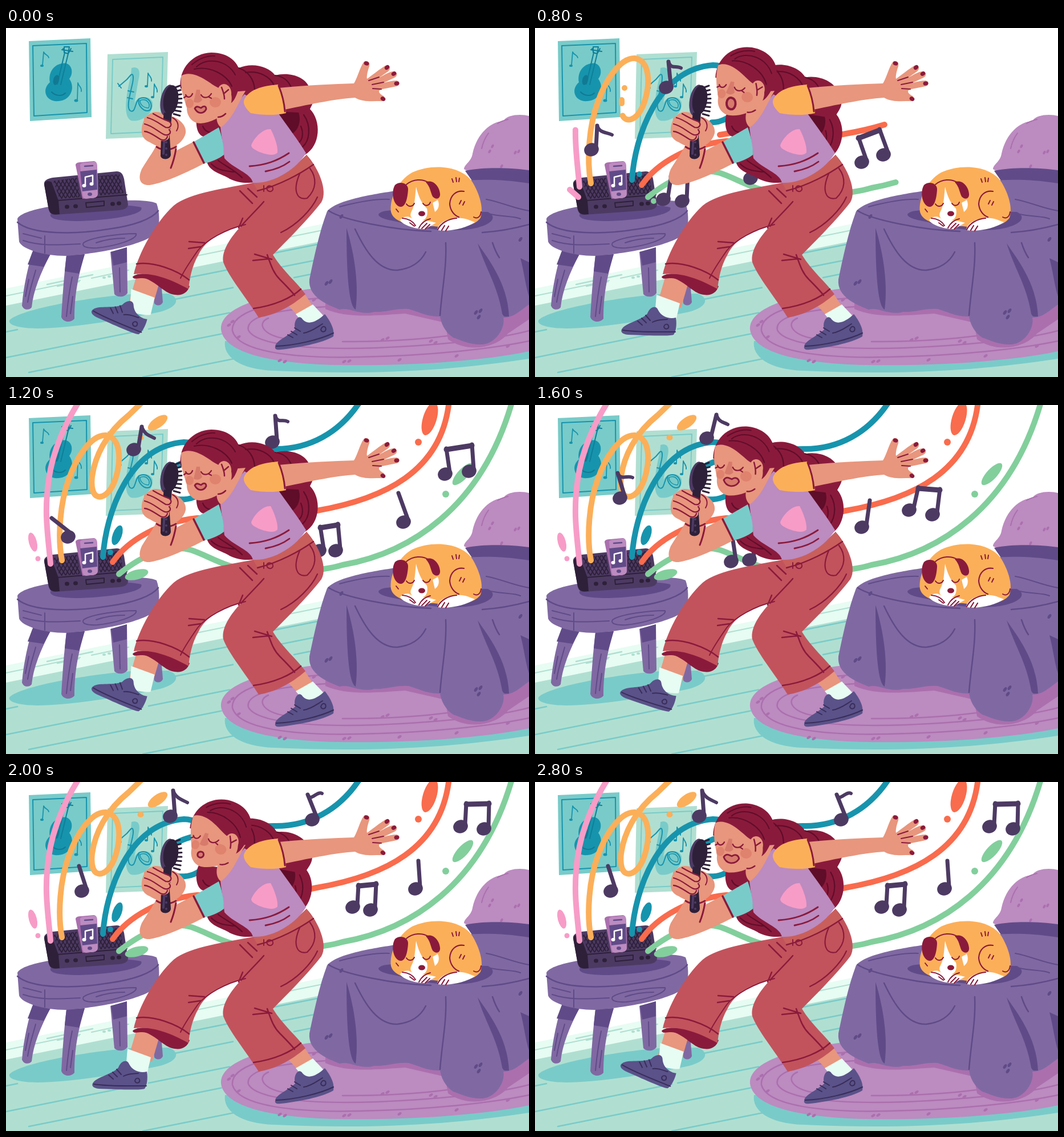
An HTML page with a canvas that plays this animation: 917 by 611 pixels, repeating every 3 s.

```html
<!DOCTYPE html>
<html lang="en">
<head>
<meta charset="utf-8">
<title>Sing along</title>
<style>
html, body { margin: 0; width: 100%; height: 100%; overflow: hidden; background: #fff; }
canvas { display: block; width: 100vw; height: 100vh; }
</style>
</head>
<body>
<canvas id="stage"></canvas>
<script>
const W = 917, H = 611, STEP = 200, STEPS = 15;
const canvas = document.getElementById('stage');
const c = canvas.getContext('2d');
const dpr = window.devicePixelRatio || 1;
canvas.width = W * dpr;
canvas.height = H * dpr;

const WINE = '#8a1a3c', DEEP = '#5f0d29', SKIN = '#e8967d', ROSE = '#d77b6c', BLUSH = '#df826e';
const PLUM = '#8069a2', DUSK = '#604b88', LILAC = '#bc8bc0', MAUVE = '#ab6fae';
const MINT = '#b0dfd1', AQUA = '#79cbc9', SEA = '#1794ad', PALE = '#e7fcf3';
const AMBER = '#fcaf59', BRICK = '#c2535c', INK = '#4d3a63', NIGHT = '#2e2039';
const PINK = '#f79cc7', CORAL = '#f96c4d', LEAF = '#82cf9c', SHOE = '#5a5289', SEAM = '#3a2d59';

function fill(d, color) {
  c.fillStyle = color;
  c.fill(new Path2D(d));
}
function line(d, color, w = 2.5) {
  c.strokeStyle = color;
  c.lineWidth = w;
  c.stroke(new Path2D(d));
}
function oval(x, y, rx, ry, color, deg = 0) {
  c.fillStyle = color;
  c.beginPath();
  c.ellipse(x, y, rx, ry, deg * Math.PI / 180, 0, 7);
  c.fill();
}
function turned(x, y, deg, dx, dy, draw) {
  c.save();
  c.translate(x + dx, y + dy);
  c.rotate(deg * Math.PI / 180);
  c.translate(-x, -y);
  draw();
  c.restore();
}

function posters() {
  fill('M40,23 L148,18 L150,156 L42,163Z', AQUA);
  line('M47,31 L141,27 L142,148 L49,154Z', SEA, 2);
  fill('M98,62 C113,58 121,76 111,89 C123,106 112,127 92,128 C71,130 61,109 77,95 C74,80 82,65 98,62Z', SEA);
  line('M90,98 L103,43 M96,99 L109,45 M103,43 L100,36 M109,45 L114,36 M102,33 L111,33 L109,45 L102,43Z M98,38 L117,41', '#0f7f99', 2);
  oval(88, 91, 5, 9, '#127993', 15);
  line('M80,112 C86,119 98,120 104,114', '#127993', 2);
  line('M64,65 L66,42 C69,48 74,47 75,52 M125,127 L126,96 C128,103 133,103 132,111', SEA, 1.8);
  oval(63, 66, 3, 2, SEA);
  oval(123, 127, 3.5, 2.5, SEA);

  fill('M178,46 L284,42 L280,190 L175,194Z', MINT);
  line('M187,55 L275,51 L271,181 L184,185Z', AQUA, 2);
  fill('M220,70 C232,66 237,74 232,92 L225,132 C230,120 250,116 257,130 C260,150 236,166 219,162 C205,154 210,120 219,82Z', AQUA);
  line('M198,102 L212,90 L219,82 M196,97 L202,105 M219,82 C223,79 224,85 222,96 C216,122 211,140 218,145 C227,150 226,130 233,124 C250,116 260,135 252,144 C242,148 230,136 233,124 M214,110 L224,112 M213,122 L222,124', SEA, 2);
  line('M235,127 C246,122 254,132 250,140 C242,140 235,135 235,127', SEA, 1.5);
  line('M248,101 L249,79 C252,86 256,86 255,93 M259,120 L260,98 C262,104 266,105 265,112', SEA, 1.8);
  oval(246, 102, 3, 2, SEA);
  oval(257, 121, 3, 2, SEA);
}

function room() {
  fill('M0,456 L560,342 V380 L0,490Z', PALE);
  fill('M0,486 L560,372 H917 V611 H0Z', MINT);
  line('M0,469 L130,442 M150,438 L215,424 M300,406 L560,353', MINT, 2);
  line('M72,449 L152,432 M90,452 L128,444', MINT, 2.5);
  oval(172, 437, 3, 2, MINT);
  oval(181, 435, 3, 2, MINT);
  for (const [x, y, end] of [[0, 532, 20], [0, 577, 240], [40, 603, 378], [250, 527, 392],
    [296, 475, 398], [320, 437, 400], [470, 394, 548], [470, 421, 538], [505, 437, 536], [240, 611, 400]])
    line(`M${x},${y} L${end},${y - (end - x) * .2}`, AQUA, 2.5);
  fill('M6,512 C18,496 120,474 220,466 L285,465 C305,472 304,488 270,497 C190,514 80,530 35,525 C15,523 4,518 6,512Z', AQUA);
  // rug
  fill('M384,548 C380,575 410,598 470,600 C640,608 780,600 917,579 V540Z', AQUA);
  fill('M377,528 C374,496 430,470 540,456 L917,440 V566 C830,584 700,592 580,590 C450,587 382,565 377,528Z', LILAC);
  line('M560,472 C450,480 394,500 397,530 C406,566 500,579 620,576 C740,574 850,562 917,548', MAUVE, 2.5);
  line('M560,488 C460,494 420,508 425,529 C438,556 540,564 650,560 C740,556 850,548 917,530', MAUVE, 2.5);
  line('M460,508 C440,516 448,537 490,544 M590,549 C680,550 760,542 800,535', MAUVE, 2.5);
  for (const [x, y] of [[391, 520], [397, 514], [408, 541], [480, 582], [489, 584], [540, 476], [593, 584],
    [602, 583], [660, 546], [669, 543], [690, 581], [745, 548], [753, 551], [790, 574], [880, 557]])
    oval(x, y, 4, 2.2, MAUVE, -35);
  fill('M560,492 C600,510 660,502 700,500 L770,516 L775,545 C810,570 860,560 880,535 L917,510 V480 H560Z', MAUVE);
}

function bed() {
  fill('M803,247 C804,238 816,234 818,220 C826,184 850,164 872,163 C878,151 904,150 917,154 V262 H830Z', LILAC);
  line('M846,184 C840,192 836,202 834,211 M880,160 C874,162 868,163 862,167', MAUVE, 2);
  for (const [x, y] of [[848, 216], [853, 207], [893, 218], [899, 216], [869, 242]]) oval(x, y, 2, 3.5, MAUVE, 30);
  fill('M805,250 C840,243 885,245 917,249 V300 H840Z', DUSK);
  fill('M563,321 C580,300 650,290 690,284 C760,270 830,258 917,272 V484 C900,496 890,507 872,507 C876,526 858,552 836,554 C812,555 797,546 784,542 C768,531 763,516 761,505 C738,506 722,496 706,492 C684,490 666,498 646,497 C620,504 603,488 585,493 C562,484 529,470 532,440 C540,402 549,358 563,321Z', PLUM);
  line('M566,320 C590,336 680,354 745,356 M835,358 C868,356 895,350 917,344', DUSK, 2.5);
  line('M585,313 C620,304 650,299 672,300 M842,300 C866,304 890,316 917,320 M846,325 C870,331 890,329 902,334', DUSK, 2);
  fill('M597,350 C607,382 620,440 613,493 C602,488 597,440 597,350Z', DUSK);
  fill('M827,377 C842,400 880,445 882,505 C872,506 872,504 870,500 C862,450 840,420 827,377Z', DUSK);
  fill('M902,403 C908,425 911,452 917,470 V410Z', DUSK);
  line('M612,352 C630,390 652,425 686,424 C712,421 728,408 736,392', DUSK, 2.5);
  line('M771,376 C773,420 764,460 761,503 M853,376 C857,388 860,395 865,402', DUSK, 2.5);
  for (const [x, y] of [[562, 447], [569, 444], [824, 498], [832, 495], [829, 506], [588, 330], [902, 370]]) oval(x, y, 2.5, 4.5, DUSK, 35);
}

function dog() {
  fill('M653,326 C660,316 690,320 720,320 L845,322 C864,332 850,346 815,352 C770,358 720,350 690,340 C670,336 653,333 653,326Z', DUSK);
  fill('M675,322 C672,300 686,268 712,253 C750,236 800,242 818,270 C830,290 838,315 832,332 C822,348 790,352 750,347 C715,348 680,342 675,322Z', AMBER);
  fill('M691,336 C698,328 708,329 718,335 L742,338 L754,341 L735,352 C715,352 694,344 691,336Z', '#fff');
  fill('M756,354 C757,343 770,334 786,334 C800,330 812,336 822,340 C808,350 780,357 756,354Z', '#fff');
  fill('M700,280 C712,264 740,264 750,284 C757,300 754,322 746,331 C735,339 715,337 704,329 C691,318 690,295 700,280Z', AMBER);
  fill('M719,278 C722,290 727,306 738,316 C741,328 736,338 726,337 C712,337 706,330 711,321 C717,310 717,296 719,278Z', '#fff');
  fill('M748,306 L757,301 C761,310 758,318 752,322Z', '#fff');
  fill('M682,275 C690,267 706,272 705,283 C704,300 700,314 691,313 C678,310 675,286 682,275Z', WINE);
  fill('M736,270 C748,264 760,277 761,290 C762,300 753,301 748,295 C744,287 744,278 736,270Z', WINE);
  line('M702,274 C714,264 730,264 740,270', WINE, 2);
  line('M702,308 C706,314 713,313 716,307 M731,307 C735,313 742,311 744,305', WINE, 2);
  oval(729, 325, 6, 4.5, WINE);
  line('M695,333 C706,334 714,339 718,346 M724,350 C728,342 735,336 744,334 M729,351 L738,342 M735,352 L743,344 M708,341 L716,347', WINE, 2);
  line('M757,353 C762,342 775,334 790,333 M764,354 L769,346 M771,355 L776,347 M778,308 C779,292 790,284 803,286 M778,308 C779,320 786,328 794,331', WINE, 2.2);
  line('M782,264 L784,270 M789,262 L790,269 M795,263 L794,269 M798,302 L795,308 M804,304 L801,310 M688,322 L684,317', WINE, 2);
  line('M820,331 C827,335 832,330 833,322', WINE, 2);
}

function table() {
  fill('M250,380 L266,372 L275,480 C272,487 263,487 260,482Z', PLUM);
  fill('M183,392 L212,384 L213,464 C208,472 195,472 190,466Z', PLUM);
  fill('M184,392 L212,384 V410 L188,416Z', DUSK);
  fill('M49,385 L79,394 C60,430 48,460 45,489 C40,495 31,494 28,486 C31,450 39,415 49,385Z', PLUM);
  fill('M49,385 L79,394 L66,418 L38,414Z', DUSK);
  fill('M106,398 L138,396 C125,440 120,470 120,509 C113,517 100,515 97,506 C99,470 102,430 106,398Z', PLUM);
  fill('M106,398 L138,396 L128,430 L103,426Z', DUSK);
  line('M38,480 C42,455 48,440 52,424 M34,470 L40,440 M106,505 C109,475 112,455 116,436 M113,500 L117,470 M200,462 L199,420', DUSK, 2);
  fill('M20,334 C28,318 90,308 160,304 C210,301 250,300 264,307 C269,320 270,340 266,357 C245,379 170,394 105,399 C65,399 28,387 23,374Z', PLUM);
  fill('M78,326 C110,310 205,306 237,314 C244,326 190,336 130,338 C100,338 75,336 78,326Z', DUSK);
  line('M20,340 C45,362 120,362 180,352 C225,346 256,334 267,320', DUSK, 2.5);
  line('M30,372 C60,382 90,380 130,378 M136,376 C150,366 200,360 228,360 C232,370 190,382 160,385 C140,386 132,382 136,376 M158,376 C175,370 195,368 208,368 M30,360 L62,368 M68,364 V394', DUSK, 2);
}

function grille(d, x0) {
  c.save();
  c.clip(new Path2D(d));
  for (let i = -6; i < 12; i++)
    line(`M${x0 + i * 7},255 l32,50 M${x0 + i * 7 + 22},255 l-26,50`, NIGHT, 1.8);
  c.restore();
}

function radio() {
  fill('M67,274 C66,267 72,264 82,262 L194,251 C202,251 205,256 207,264 L214,309 C213,316 207,318 198,319 L86,327 C78,327 75,322 74,313Z', INK);
  fill('M67,274 C67,268 74,266 80,270 L92,302 L94,326 C80,328 76,324 74,313Z', NIGHT);
  line('M90,302 L212,292', NIGHT, 2);
  grille('M83,268 L124,262 L130,296 L94,299Z', 84);
  grille('M162,259 L199,256 L206,289 L164,293Z', 164);
  line('M140,306 L172,303 L172,311 L141,314Z', NIGHT, 2);
  for (const [x, y] of [[107, 313], [122, 312], [187, 308], [198, 307]]) oval(x, y, 4, 3.5, NIGHT);
  fill('M122,240 C122,236 127,235 132,235 L154,233 C160,234 159,239 160,244 L161,290 C160,297 155,298 148,298 L134,299Z', MAUVE);
  fill('M130,240 C130,237 134,236 138,236 L155,234 C160,235 160,240 160,244 L161,291 C160,297 155,298 148,298 L141,299 C136,299 135,296 134,290Z', LILAC);
  fill('M130,251 L159,248 L160,283 L134,286Z', DUSK);
  line('M138,242 L152,241', DUSK, 2.5);
  oval(147, 291, 4, 3, DUSK);
  line('M139,275 V261 L152,258 V272', '#fff', 2.5);
  oval(137, 276, 3.5, 3, '#fff');
  oval(150, 273, 3.5, 3, '#fff');
}

// path, colour, length reached while the first burst hangs
const ribbons = [
  ['M78,278 C74,230 66,190 75,130 C82,80 105,30 128,-6', PINK, 100],
  ['M98,272 C90,230 95,170 110,130 C122,95 148,52 175,53 C205,57 203,110 186,143 C172,168 146,170 151,125 C156,90 175,50 215,18 L242,-8', AMBER, 395],
  ['M170,266 C175,190 215,72 312,65 C350,66 375,100 352,142 C338,170 285,175 278,145 C275,110 310,98 345,92 C400,85 420,77 470,77 C530,78 585,50 622,-8', SEA, 425],
  ['M187,275 C215,235 270,205 335,198 C420,195 500,195 545,185 C660,165 765,118 777,-8', CORAL, 452],
  ['M198,296 C240,262 285,243 325,254 C355,264 385,285 430,290 C480,295 550,292 590,280 C705,260 834,183 888,-8', LEAF, 455]
];
const growth = [0, .1, .45, 1, 1, 1.6];

function drawRibbons(step) {
  if (!step) return;
  for (const [d, color, reach] of ribbons) {
    c.setLineDash(step < 6 ? [reach * growth[step], 9999] : []);
    line(d, color, 10);
  }
  c.setLineDash([]);
  if (step === 3 || step === 4) {
    line('M61,283 L76,296', PINK, 10);
    line('M152,126 V132', AMBER, 10);
    oval(157, 105, 5, 5, AMBER);
    oval(183, 256, 5, 5, SEA);
    line('M324,187 L342,184', CORAL, 10);
    oval(208, 303, 5, 5, LEAF);
  }
  if (step > 4) {
    oval(47, 240, 7, 17, PINK, -15);
    oval(56, 269, 4.5, 4.5, PINK);
    oval(195, 228, 8, 18, SEA, 20);
    oval(183, 258, 5, 5, SEA);
    oval(229, 297, 21, 8.5, LEAF, -15);
  }
  if (step > 5) {
    oval(266, 31, 20, 9, AMBER, -35);
    oval(236, 57, 5.5, 5, AMBER);
    oval(743, 24, 12, 30, CORAL, 17);
    oval(723, 65, 6, 6, CORAL);
    oval(801, 121, 25, 9, LEAF, -47);
    oval(771, 156, 6, 6, LEAF);
  }
}

// head x,y, stem top x,y, then a flag tip (6 values) or a second note (8 values)
const notesA = [[224, 78, 238, 38, 260, 58], [467, 65, 472, 19, 494, 29], [109, 231, 80, 198], [697, 205, 688, 154],
  [770, 121, 772, 76, 812, 116, 817, 69], [549, 255, 551, 213, 578, 255, 582, 208]];
const notesB = [[301, 58, 318, 17, 338, 34], [149, 163, 145, 119, 171, 127], [573, 214, 587, 167],
  [656, 184, 672, 144, 697, 192, 710, 147], [344, 274, 346, 230, 376, 271, 381, 230]];
const notesC = [[288, 60, 293, 15, 318, 36], [537, 66, 529, 22, 554, 20], [133, 191, 128, 147], [718, 187, 723, 138],
  [797, 78, 807, 37, 838, 82, 847, 36], [608, 219, 618, 180, 639, 224, 649, 177]];
const burst = [[230, 104, 234, 59, 256, 70], [99, 213, 109, 171, 135, 187], [378, 263, 386, 225],
  [573, 235, 567, 191, 611, 222, 604, 177], [225, 300, 239, 258, 258, 303, 268, 256]];
const spark = [[216, 128, 225, 88, 246, 104], [108, 232, 106, 190, 130, 196], [226, 290, 240, 250, 262, 290, 272, 246]];
const noteSteps = [[], [], [], spark, burst, notesB, notesA, notesC, notesB, notesA, notesC, notesB, notesA, notesC, notesC];

function note([x, y, tx, ty, ...rest]) {
  const stem = (hx, hy, sx, sy) => {
    oval(hx, hy, 13, 11.5, INK, -20);
    line(`M${hx + 8},${hy - 4} L${sx},${sy}`, INK, 7);
  };
  stem(x, y, tx, ty);
  if (rest.length === 2) {
    const [fx, fy] = rest;
    line(`M${tx},${ty} C${tx + 5},${ty + 14} ${fx - 9},${fy - 5} ${fx},${fy}`, INK, 6);
  } else if (rest.length === 4) {
    const [, , ux, uy] = rest;
    stem(...rest);
    line(`M${tx},${ty + 2} L${ux},${uy + 2}`, INK, 9);
  }
}

function backHair(tilt) {
  turned(440, 105, tilt * .6, 0, 0, () => {
    fill('M350,60 C380,48 400,60 408,70 C430,60 460,66 472,83 C497,76 526,86 532,105 C546,118 538,132 533,142 C553,162 552,206 524,222 L470,190 L400,190Z', WINE);
    fill('M470,146 L513,148 C519,165 510,184 498,186 L470,170Z', DEEP);
    line('M408,70 C425,76 435,90 436,108 M420,78 C445,74 463,86 470,100 M472,83 C488,85 496,94 500,104 M522,152 C536,172 532,198 520,208 M517,172 C522,184 520,195 514,200', DEEP, 2.2);
  });
  fill('M338,146 C331,158 332,186 346,190 L352,230 C352,252 382,256 392,264 C408,272 424,272 436,270 L420,190 L385,150Z', WINE);
  line('M360,238 C372,250 385,250 400,252 M372,232 C385,242 400,248 414,262 M345,172 C350,184 362,186 374,180', DEEP, 2.2);
}

function farArm() {
  fill('M478,105 C530,100 575,98 610,97 C616,88 620,70 627,60 C632,55 639,59 637,67 C634,76 632,84 633,89 C643,82 655,72 665,66 C673,63 676,71 670,76 L654,87 C664,82 672,76 680,76 C687,77 687,84 681,87 L662,96 C670,94 678,92 685,92 C691,93 691,101 685,102 L660,107 C650,109 654,115 662,119 C667,124 663,129 657,128 C643,128 625,130 612,122 C580,124 540,132 488,143Z', SKIN);
  for (const [x, y, a] of [[632, 62, 20], [668, 69, -40], [680, 80, -30], [685, 97, -10], [661, 124, 30]]) oval(x, y, 4.5, 3.5, WINE, a);
  line('M636,92 L654,86 M642,99 L662,95 M643,106 L658,107', WINE, 2);
}

function nearFoot(tilt) {
  fill('M230,430 L270,442 L256,490 L216,478Z', SKIN);
  turned(0, 0, 0, tilt * .3, -tilt * .45, () =>
    fill('M213,467 L254,482 L247,512 C235,514 218,510 210,503Z', PALE));
  turned(240, 510, tilt, 0, 0, () => {
    fill('M153,526 C160,516 186,512 197,500 C201,489 212,484 216,494 C222,506 236,510 247,507 C249,520 247,532 243,537 C235,540 195,538 163,537 C152,536 149,531 153,526Z', SHOE);
    line('M154,529 C180,533 215,532 246,532 M180,513 L188,520 M187,508 L195,516 M194,503 L202,512 M206,515 C215,510 224,511 232,510', SEAM, 2);
    line('M226,523 C228,516 236,518 234,525 C231,528 227,527 226,523', SEAM, 2);
  });
}

function legs(footTilt) {
  nearFoot(footTilt);
  fill('M494,485 L524,466 L540,490 L512,504Z', SKIN);
  fill('M508,501 L538,484 L556,503 C548,514 535,520 524,520Z', PALE);
  fill('M472,558 C472,548 494,540 507,528 C503,512 514,500 520,510 C530,522 546,513 559,501 C568,512 577,528 574,540 C555,552 510,560 482,563 C474,564 471,562 472,558Z', SHOE);
  line('M474,557 C505,556 550,546 574,534 M494,537 L503,542 M500,531 L510,537 M506,525 L516,531 M522,534 C535,532 545,524 555,518', SEAM, 2);
  line('M552,528 C555,520 563,522 560,530 C557,533 553,532 552,528', SEAM, 2);

  fill('M222,436 C230,424 290,432 322,452 C318,464 308,469 296,467 C280,466 266,447 246,439 C236,436 224,442 222,436Z', WINE);
  fill('M433,271 C465,270 505,245 527,222 C548,245 565,285 553,305 C530,335 490,375 468,397 C485,425 510,445 525,466 C500,488 470,503 443,507 C420,470 390,435 381,410 C377,390 395,365 412,347 C385,352 350,370 338,396 C325,418 322,440 320,457 C300,446 262,426 224,431 C232,395 262,340 294,311 C322,288 390,280 433,271Z', BRICK);
  fill('M433,271 C465,270 505,245 527,222 L538,240 C515,256 475,276 441,284Z', '#c95f5c');
  line('M441,285 C478,276 515,256 539,239 M229,413 C258,408 300,424 321,441 M434,491 C470,486 500,473 517,457', WINE, 2.5);
  line('M412,347 C425,332 440,318 452,304 M415,333 L408,350 M410,285 L432,307 M424,281 L440,296', WINE, 2.5);
  line('M420,344 C385,352 350,372 336,390 C322,410 312,425 306,438', WINE, 2);
  line('M321,374 L348,376 M320,386 L341,383 M436,396 L466,405 M433,407 L462,404 M458,397 C466,420 470,430 480,440 C492,452 500,460 506,468', WINE, 2.5);
  line('M533,246 C545,262 545,282 528,298 C510,302 502,285 515,255 M546,296 C536,318 510,345 482,358', WINE, 2.2);
  line('M452,276 V286 M457,280 C460,274 469,276 468,283 C465,288 458,287 457,280', WINE, 2);
}

function torso() {
  fill('M418,116 C400,135 396,160 376,174 L383,228 C398,246 430,254 433,271 C470,273 510,246 526,219 C512,196 492,170 478,150Z', LILAC);
  fill('M430,205 C436,190 452,176 464,177 C470,188 477,206 476,218 C470,226 450,220 440,215 C434,212 430,209 430,205Z', PINK);
  line('M427,242 C455,240 475,233 496,219 M455,251 C472,248 485,243 497,234', WINE, 2.8);
  fill('M371,146 L395,112 L420,110 C405,135 398,158 377,174 C374,172 366,164 371,146Z', SKIN);
  fill('M417,127 C424,108 450,101 477,99 C485,115 489,132 491,149 C470,154 445,152 429,149 C421,142 416,134 417,127Z', AMBER);
  line('M478,101 C485,118 488,133 489,146', WINE, 3);
  fill('M328,200 L373,174 C378,188 382,205 382,222 C373,229 361,234 348,237Z', AQUA);
}

const lips = [
  ['M331,141 C334,135 339,139 342,140 C347,135 351,137 351,142 C347,150 337,152 331,141Z', 2.8],
  ['M329,141 C333,133 339,137 343,138 C349,132 355,136 356,141 C350,153 335,153 329,141Z', 2.8],
  ['M340,136 C351,136 352,156 342,156 C331,156 330,136 340,136Z', 4],
  ['M333,142 C341,139 343,151 335,152 C328,152 328,144 333,142Z', 3]
];

function head([tilt, dx, dy], mouth) {
  turned(383, 112, tilt, dx, dy, () => {
    fill('M306,106 C302,70 328,44 360,43 C390,43 409,60 411,82 C412,100 402,130 393,132 L330,110Z', WINE);
    fill('M307,84 C305,108 313,125 317,140 C317,156 328,167 341,167 C358,166 378,157 391,140 C400,126 396,104 382,106 C372,108 362,98 350,91 C336,82 318,76 307,84Z', SKIN);
    oval(322, 132, 7, 8, BLUSH);
    oval(367, 130, 10, 9, BLUSH);
    fill('M334,108 L329,129 C335,132 340,131 344,126 C341,120 340,114 340,108Z', ROSE);
    oval(383, 113, 12, 15, SKIN, -10);
    line('M378,104 C381,112 383,116 383,124 M383,114 L390,108 M372,156 C378,156 382,153 385,150', WINE, 2.5);
    line('M315,117 C318,123 324,122 327,115 M315,120 L312,122 M342,117 C346,124 355,123 360,115 M356,121 L360,123', WINE, 2.3);
    line('M330,72 C356,66 386,80 396,102 M334,68 C352,50 388,56 402,82 M326,64 C340,52 355,48 366,49', DEEP, 2);
    const [d, w] = lips[mouth];
    fill(d, ROSE);
    line(d, WINE, w);
  });
}

function nearArm() {
  fill('M329,199 L348,237 C318,252 282,270 252,275 C236,276 230,265 238,247 C249,228 264,210 268,194 L300,205 C300,210 298,213 296,216Z', SKIN);
  line('M329,200 L347,236', WINE, 3.5);
  line('M298,212 C296,224 293,235 289,245 M264,208 C274,215 288,214 298,208', WINE, 3);
  fill('M238,182 C237,166 245,150 260,147 C275,146 282,154 292,155 C306,160 317,172 315,184 C312,196 302,206 290,208 C275,212 262,206 252,200 C243,196 238,190 238,182Z', SKIN);
  for (let i = 0; i < 8; i++) line(`M294,${105 + i * 6.5} l${11 + 3 * Math.sin(i / 2.2)},${i - 4}`, NIGHT, 3);
  oval(284, 127, 13, 28, INK, 10);
  oval(289, 126, 13, 26, NIGHT, 8);
  fill('M277,148 L291,150 L287,190 L289,222 C288,231 273,232 271,224 L272,190Z', NIGHT);
  line('M278,188 L276,220', INK, 4);
  for (const y of [200, 211, 222]) oval(281, y, 2, 2, INK);
  fill('M242,158 C252,146 268,158 284,164 C293,165 294,174 286,177 C296,176 296,188 286,188 C288,196 278,199 270,197 C250,198 240,188 242,158Z', SKIN);
  line('M248,157 C260,160 270,168 280,174 M243,168 C256,171 265,180 276,186 M243,181 C253,182 262,190 271,195 M258,150 C268,156 276,160 285,163 C294,168 288,176 280,174 M286,178 C292,184 284,190 276,186 M283,190 C281,197 275,197 271,195', WINE, 2.3);
  line('M292,157 C302,162 304,172 299,180', WINE, 2);
}

const headPoses = [[0, 0, 0], [7, 5, -3], [10, 8, -6], [13, 13, -8]];
const footTilts = [22, 17, 0, -8];
const headSteps = [0, 1, 2, 3, 2, 1, 0, 0, 1, 2, 3, 2, 1, 0, 1];
// the foot lands a little late on the second beat
const footSteps = [0, 1, 2, 3, 2, 1, 0, 0, 1, 1, 2, 3, 2, 1, 0];

function draw(step) {
  c.setTransform(dpr, 0, 0, dpr, 0, 0);
  c.lineCap = c.lineJoin = 'round';
  c.fillStyle = '#fff';
  c.fillRect(0, 0, W, H);
  posters();
  room();
  bed();
  dog();
  table();
  radio();
  drawRibbons(step);
  noteSteps[step].forEach(note);
  const pose = headSteps[step];
  backHair(headPoses[pose][0]);
  farArm();
  legs(footTilts[footSteps[step]]);
  torso();
  head(headPoses[pose], pose);
  nearArm();
}

let shown = -1;
const start = performance.now();
function tick() {
  const step = Math.floor((performance.now() - start) / STEP) % STEPS;
  if (step !== shown) draw(shown = step);
  requestAnimationFrame(tick);
}
tick();
</script>
</body>
</html>
```
